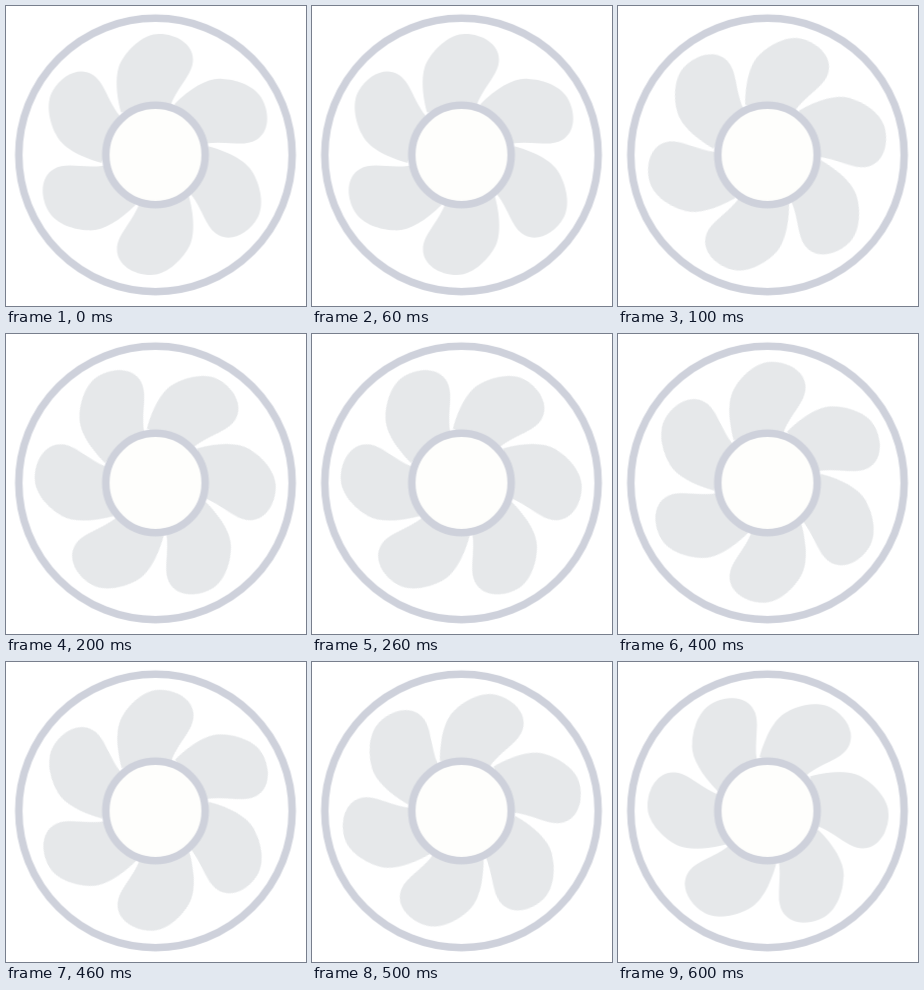
Recreate the animation shown at these times as an HTML page. Size 300 by 300 pixels, loop 0.7 s.

```html
<!DOCTYPE html>
<html lang="en">
<head>
<meta charset="utf-8">
<title>Fan</title>
<style>
  html, body { margin: 0; width: 100%; height: 100%; overflow: hidden; background: #fff; }
  svg { display: block; width: 300px; height: 300px; }
  .blades { fill: #e6e8ea; animation: spin 700ms steps(7, end) infinite; }
  .ring { fill: none; stroke: #ced1db; stroke-width: 7.5; }
  .hub { fill: #fefefc; }
  /* 15 degrees per 100 ms step */
  @keyframes spin {
    from { transform: rotate(0deg); }
    to { transform: rotate(105deg); }
  }
</style>
</head>
<body>
<svg viewBox="0 0 300 300">
  <defs>
    <path id="blade" d="M-34 -42 C-40 -65 -40 -85 -32 -96 C-25 -107 -11 -120.5 4 -120.5 C22 -120.5 38 -110 38 -95 C38 -80 24 -70 16 -50 Z"/>
  </defs>
  <g transform="translate(149.5 148.9)">
    <g class="blades">
      <!-- the wheel sits slightly off its axle -->
      <g transform="translate(-.5 -.4)">
        <use href="#blade"/>
        <use href="#blade" transform="rotate(60)"/>
        <use href="#blade" transform="rotate(120)"/>
        <use href="#blade" transform="rotate(180)"/>
        <use href="#blade" transform="rotate(240)"/>
        <use href="#blade" transform="rotate(300)"/>
      </g>
    </g>
    <circle class="ring" r="136.7"/>
    <circle class="ring hub" r="49.7"/>
  </g>
</svg>
</body>
</html>
```
